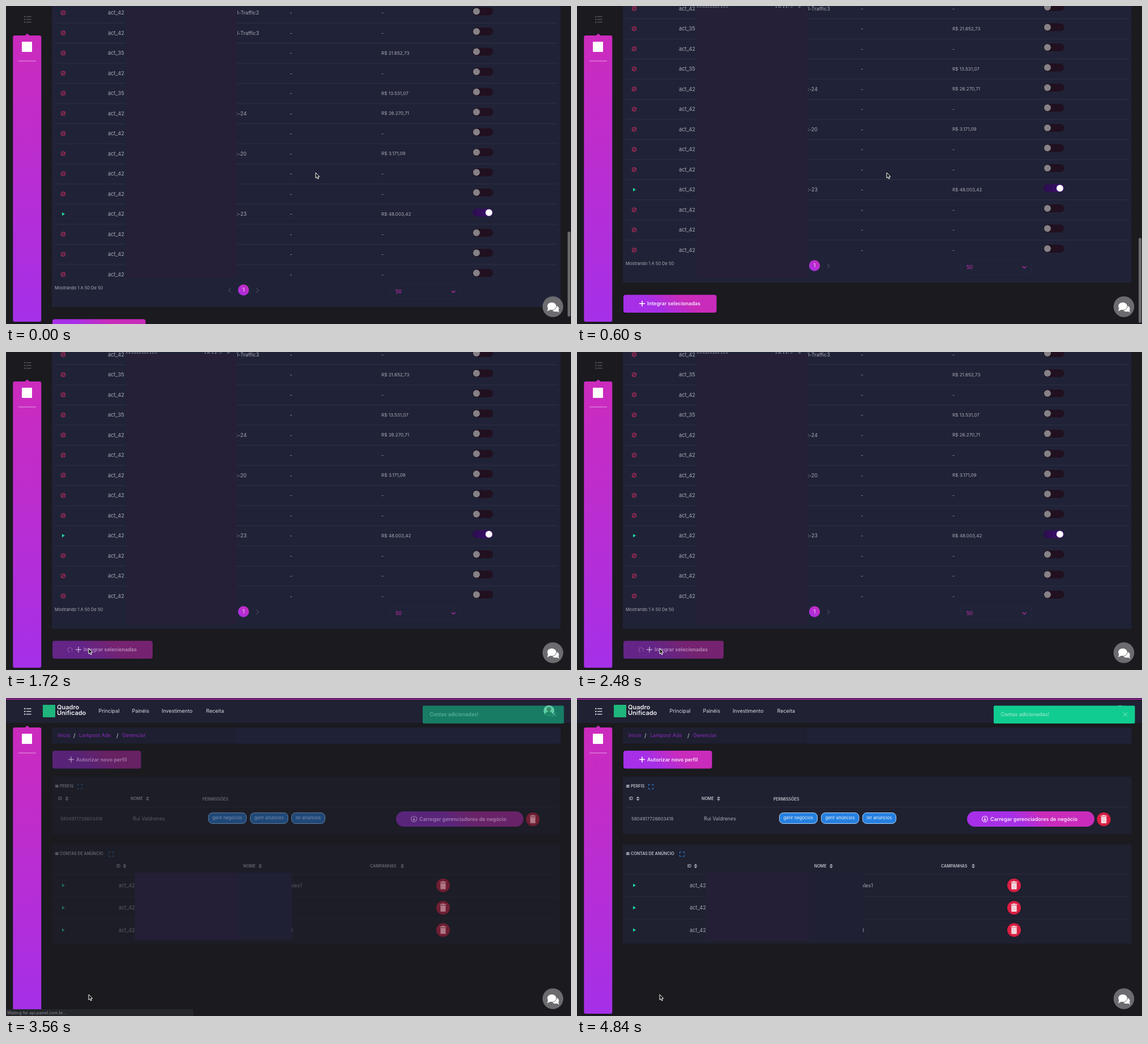
An HTML page with a canvas for the animation above (5.68 s loop, 998 by 561 pixels).

```html
<!DOCTYPE html>
<html lang="pt-BR">
<head>
<meta charset="utf-8">
<style>
  html, body { margin: 0; width: 100%; height: 100%; overflow: hidden; background: #1a1a1f; }
  canvas { display: block; }
</style>
</head>
<body>
<canvas id="stage" width="998" height="561"></canvas>
<script>
const c = document.getElementById('stage').getContext('2d');
const LOOP = 5680, PITCH = 35.5;
const BG = '#1a1a1f', MASK = '#252038', INK = '#a9a9b5', PINK = '#c92bbb', VIOLET = '#a72fe7', GREEN = '#1fd8a0';

// account prefix, campaign name, right edge of the name, budget, active
const rows = [
  ['42', 'AB Mídia-Funil-Traffic2', 447], ['42', 'AB Mídia-Funil-Traffic3', 447],
  ['35', '', 0, '21.652,73'], ['42'], ['35', '', 0, '13.531,07'],
  ['42', 'Traffic-24', 425, '26.270,71'], ['42'], ['42', 'Traffic-20', 425, '3.171,09'],
  ['42'], ['42'], ['42', 'Traffic-23', 425, '48.003,42', true], ['42'], ['42'], ['42']
];

const clamp = v => Math.max(0, Math.min(1, v));
const ramp = (t, from, to) => clamp((t - from) / (to - from));
const easeOut = u => 1 - (1 - u) ** 2;
const easeInOut = u => u * u * (3 - 2 * u);

function box(x, y, w, h, fill, r = 0, border) {
  c.beginPath();
  c.roundRect(x, y, w, h, r);
  if (fill) { c.fillStyle = fill; c.fill(); }
  if (border) { c.strokeStyle = border; c.lineWidth = 1; c.stroke(); }
}

function disc(x, y, rx, fill, ry = rx) {
  c.beginPath();
  c.ellipse(x, y, rx, ry, 0, 0, 7);
  c.fillStyle = fill;
  c.fill();
}

// points: flat list x, y, x, y...
function trace(points, close) {
  c.beginPath();
  for (let i = 0; i < points.length; i += 2) c.lineTo(points[i], points[i + 1]);
  if (close) c.closePath();
}

function line(points, color, width = 1) {
  trace(points);
  c.strokeStyle = color;
  c.lineWidth = width;
  c.stroke();
}

function shape(points, fill) {
  trace(points, true);
  c.fillStyle = fill;
  c.fill();
}

function text(s, x, y, color = INK, size = 9, weight = 400, align = 'left') {
  c.font = `${weight} ${size}px Inter, sans-serif`;
  c.textAlign = align;
  c.textBaseline = 'middle';
  c.fillStyle = color;
  c.fillText(s, x, y + 0.5);
}

function blend(x0, y0, x1, y1, from, to) {
  const g = c.createLinearGradient(x0, y0, x1, y1);
  g.addColorStop(0, from);
  g.addColorStop(1, to);
  return g;
}

function faded(alpha, paint) {
  c.save();
  c.globalAlpha *= alpha;
  paint();
  c.restore();
}

function shifted(dx, dy, paint) {
  c.save();
  c.translate(dx, dy);
  paint();
  c.restore();
}

// steep diagonal: violet at the bottom left, pink at the top right
function pinkFill(x, y, w, h) {
  const mid = x + w / 2, lean = h * 0.45;
  return blend(mid - lean, y + h, mid + lean, y, VIOLET, PINK);
}

function plus(x, y) {
  line([x - 5, y, x + 5, y], '#fff', 1.6);
  line([x, y - 5, x, y + 5], '#fff', 1.6);
}

function button(y, w, label, indent = 0) {
  box(82, y, w, 31.5, pinkFill(82, y, w, 31), 4);
  plus(115 + indent, y + 15.5);
  text(label, 124 + indent, y + 15.5, '#f4e6f8', 9, 600);
}

function play(x, y) { shape([x - 2, y - 3, x + 3, y, x - 2, y + 3], GREEN); }

function blocked(x, y) {
  c.beginPath();
  c.arc(x, y, 3.5, 0, 7);
  c.strokeStyle = '#c92b62';
  c.lineWidth = 1.1;
  c.stroke();
  line([x - 2.4, y + 2.4, x + 2.4, y - 2.4], '#c92b62', 1.1);
}

function toggle(y, on) {
  box(824, y - 7, 36.5, 14, on ? blend(824, 0, 850, 0, '#2a0d4c', '#3a1068') : '#21101f', 7);
  disc(on ? 853 : 831, y, 6, on ? '#fff' : '#858287');
}

function menuIcon(color) {
  for (const y of [18.8, 23.7, 28.6]) {
    box(32, y - 1, 2.5, 2, color);
    box(36, y - 0.7, 8.5, 1.4, color);
  }
}

function sidebar() {
  box(12.3, 52, 50, 505, blend(0, 52, 0, 557, '#cc2bbd', '#a530e8'), 3);
  shape([33, 52.5, 37.5, 48.5, 42, 52.5], '#cc2bbd');
  box(28, 63, 18, 18, '#fff', 1);
  line([22, 97, 53, 97], '#e6a0e4');
}

function chat() {
  const gray = '#6c6c70';
  disc(966, 530.5, 18.3, gray);
  disc(970.5, 534, 6.2, '#fff', 5.2);
  shape([971, 537, 977, 541, 975.5, 535], '#fff');
  disc(964, 529.5, 8.8, gray, 7.6);
  disc(964, 529.5, 7.8, '#fff', 6.6);
  shape([958, 531, 956, 538.5, 963, 535], '#fff');
}

function arrow(x, y) {
  shifted(x, y, () => {
    const p = [0, 0, 0, 9.6, 2.2, 7.6, 3.7, 11, 5.3, 10.3, 3.9, 7, 6.8, 7];
    shape(p, '#111');
    trace(p, true);
    c.strokeStyle = '#fff';
    c.lineWidth = 1;
    c.stroke();
  });
}

function hand(x, y) {
  shifted(x, y, () => {
    const p = [0, 0, 1.6, 0, 1.8, 4, 5.8, 4.8, 6, 8, 4.8, 11, 0.4, 11, -2.6, 6.4, -1.6, 5.6, 0, 7];
    shape(p, '#fff');
    trace(p, true);
    c.strokeStyle = '#111';
    c.lineWidth = 0.8;
    c.stroke();
  });
}

function spinner(x, y, t) {
  c.save();
  c.translate(x, y);
  c.rotate(t / 750 * 2 * Math.PI);
  c.setLineDash([2, 1.6]);
  c.beginPath();
  c.arc(0, 0, 4, 0, 5);
  c.strokeStyle = '#e0c8e8';
  c.lineWidth = 1.1;
  c.stroke();
  c.restore();
}

function table() {
  box(81, -20, 898.5, 551, '#202337');
  rows.forEach(([account, name = '', edge, budget, on], i) => {
    const y = 12 + i * PITCH;
    (on ? play : blocked)(101, y);
    text(`act_${account}`, 180, y, INK, 9.3);
    text('650913813483', 211, y, INK, 8);
    if (name) text(name, edge, y, INK, 9, 400, 'right');
    text('-', 501.5, y);
    text(budget ? `R$ ${budget}` : '-', 663, y, INK, budget ? 8.1 : 9);
    toggle(y - 2.5, on);
    if (i < rows.length - 1) line([86, y + 18, 974, y + 18], '#33364a', 0.8);
  });
  text('Mostrando 1 A 50 De 50', 86, 497, INK, 7.5);
  line([397, 497.5, 393, 501.5, 397, 505.5], '#43465a', 1.2);
  disc(419.5, 501, 9.7, pinkFill(410, 491, 19, 19));
  text('1', 419.5, 501, '#f4e6f8', 9, 400, 'center');
  line([442, 497.5, 446, 501.5, 442, 505.5], '#43465a', 1.2);
  box(678.5, 491.5, 124, 25, null, 2, '#25283d');
  text('50', 688, 504, PINK, 9);
  line([787, 502.5, 790.3, 505.5, 793.6, 502.5], PINK, 1.1);
}

function listPage(t) {
  const scroll = 43 * easeOut(ramp(t, 20, 240));
  const bounce = 4 * Math.sin(Math.PI * ramp(t, 200, 500));
  const busy = easeInOut(ramp(t, 1360, 1560));
  shifted(0, -bounce, () => {
    shifted(0, -scroll, () => {
      table();
      faded(1 - 0.48 * busy, () => button(552.5, 164.5 + 12.5 * busy, 'Integrar selecionadas', 13 * busy));
      if (busy) faded(0.6 * busy, () => spinner(113, 568.5, t));
    });
    menuIcon('#55555b');
    sidebar();
    chat();
  });
  box(211, 3, 197, 478, MASK);
  faded(1 - ramp(t, 680, 920), () => box(992, 398 + scroll * 11 / 43, 5, 150, '#6a6a6d', 2.5));

  const move = easeInOut(ramp(t, 640, 1060));
  const x = 547 - 401 * move, y = 294 + 229 * move;
  if (t >= 1060 && t < 1400) hand(x + 1, y);
  else arrow(x, y);
}

function head(s, x, y, sortX) {
  text(s, x, y, '#c3c3cc', 7.1, 600);
  if (!sortX) return;
  shape([sortX - 3, y - 0.8, sortX, y - 3.8, sortX + 3, y - 0.8], '#b5b5c0');
  shape([sortX - 3, y + 0.8, sortX, y + 3.8, sortX + 3, y + 0.8], '#b5b5c0');
}

function panelTitle(s, y, expandX) {
  box(87, y - 2.5, 5.5, 5, '#a5a5b0', 0.5);
  line([87, y, 92.5, y], '#3a3a4a', 0.6);
  head(s, 95, y);
  for (const i of [-1, 1]) for (const j of [-1, 1]) {
    const x = expandX + i * 4, v = y + 1 + j * 4;
    line([x - i * 2.6, v, x, v, x, v - j * 2.6], '#2578cc', 1.2);
  }
}

function trash(x, y) {
  disc(x, y, 12, '#d91f42');
  box(x - 5.5, y - 6.5, 11, 1.8, '#f5dfe4', 0.5);
  box(x - 2, y - 7.5, 4, 1.5, '#f5dfe4', 0.5);
  box(x - 4.7, y - 4, 9.4, 11, '#f5dfe4', 1);
  for (const d of [-2, 0, 2]) line([x + d, y - 2, x + d, y + 5], '#e8a8b5', 0.6);
}

function pill(x, w, label) {
  box(x + 0.5, 202.5, w - 1, 19, '#2580e0', 7, '#b4d2f2');
  text(label, x + w / 2, 211.5, '#e3effc', 7.7, 400, 'center');
}

function profiles() {
  box(81, 139, 898.5, 101, '#1f2030');
  panelTitle('PERFIS', 155.5, 130.5);
  head('ID', 92, 177.5, 107.5);
  head('NOME', 220, 177.5, 250);
  head('PERMISSÕES', 347, 178);
  line([86, 192.5, 974, 192.5], '#30313f', 0.8);
  text('5804917726603418', 96, 213, INK, 7.9);
  text('Rui Valdrenes', 224, 213, INK, 8.8);
  pill(357, 68, 'gerir negócios');
  pill(431, 67.5, 'gerir anúncios');
  pill(504, 60, 'ler anúncios');
  box(689, 200, 225, 27, pinkFill(689, 200, 225, 27), 13.5);
  c.beginPath();
  c.arc(720.5, 213.5, 5, 0, 7);
  c.strokeStyle = '#f4e6f8';
  c.lineWidth = 1.1;
  c.stroke();
  line([720.5, 210, 720.5, 216], '#f4e6f8', 1.1);
  line([718, 213.8, 720.5, 216.3, 723, 213.8], '#f4e6f8', 1.1);
  text('Carregar gerenciadores de negócio', 730, 213.5, '#f4e6f8', 9, 600);
  trash(930.5, 214);
}

function accounts() {
  box(81, 258, 898.5, 175, '#1f2030');
  panelTitle('CONTAS DE ANÚNCIO', 274.5, 185.5);
  head('ID', 195, 296.5, 209.5);
  head('NOME', 419, 296.5, 449);
  head('CAMPANHAS', 643, 296.5, 700);
  ['Sales1', '', '3'].forEach((name, i) => {
    const y = 330.5 + i * 39.4;
    line([86, y - 19.5, 974, y - 19.5], '#30313f', 0.8);
    play(101, y);
    text('act_42', 199, y, INK, 9.3);
    text(name, i ? 507 : 523, y, INK, 9, 400, 'right');
    trash(772, y);
  });
}

function header() {
  box(0, 0, 998, 44, '#202133');
  box(0, 1, 998, 2, '#a3209a');
  menuIcon('#d8d8de');
  box(65, 12, 22, 22, '#1fb57c', 1);
  text('Quadro', 90, 16, '#f0f0f4', 11, 600);
  text('Unificado', 90, 26.5, '#f0f0f4', 11, 600);
  [['Principal', 163.5], ['Painéis', 222.5], ['Investimento', 275], ['Receita', 353.5]]
    .forEach(([s, x]) => text(s, x, 23, '#dcdce4', 9));
  disc(959, 22.5, 9.5, '#b9cdbf');
  c.save();
  c.beginPath();
  c.arc(959, 22.5, 9.5, 0, 7);
  c.clip();
  disc(959, 20, 4, '#5a4a40');
  disc(959, 32, 8, '#2c3a36');
  c.restore();
}

function breadcrumb() {
  box(81, 52, 898.5, 28.5, '#1e1f31');
  box(407, 52, 572.5, 28.5, '#1f2237');
  [['Início', 91], ['Larkpost Ads', 129], ['Gerenciar', 205]].forEach(([s, x]) => text(s, x, 66, '#8a2cba', 9));
  for (const x of [119, 195]) text('/', x, 66, '#d5d5dd', 10);
}

function toast() {
  box(736, 13.5, 249.5, 31.5, '#11cc90', 2);
  text('Contas adicionadas!', 748.5, 29, '#9fe6cb', 8.8, 500);
  line([965, 25.5, 972, 32.5], '#95e3c6', 1);
  line([972, 25.5, 965, 32.5], '#95e3c6', 1);
}

function accountPage(t) {
  header();
  breadcrumb();
  sidebar();
  faded(easeOut(ramp(t, 3360, 4160)), () => {
    button(93, 156.5, 'Autorizar novo perfil');
    profiles();
    accounts();
  });
  if (t >= 3360) {
    box(228, 308, 277, 119, '#1f2034');
    box(228, 308, 182, 119, '#241f36');
  }
  faded(ramp(t, 3380, 3720), toast);
  if (t < 3640) {
    box(0, 549, 331, 12, '#26272c');
    text('Waiting for api.painel.com.br...', 2, 555.5, '#8a8a90', 7.3);
  }
  chat();
  arrow(146, 523);
}

const start = performance.now();
function frame() {
  const t = (performance.now() - start) % LOOP;
  box(0, 0, 998, 561, BG);
  (t < 3200 ? listPage : accountPage)(t);
  requestAnimationFrame(frame);
}
frame();
</script>
</body>
</html>
```
